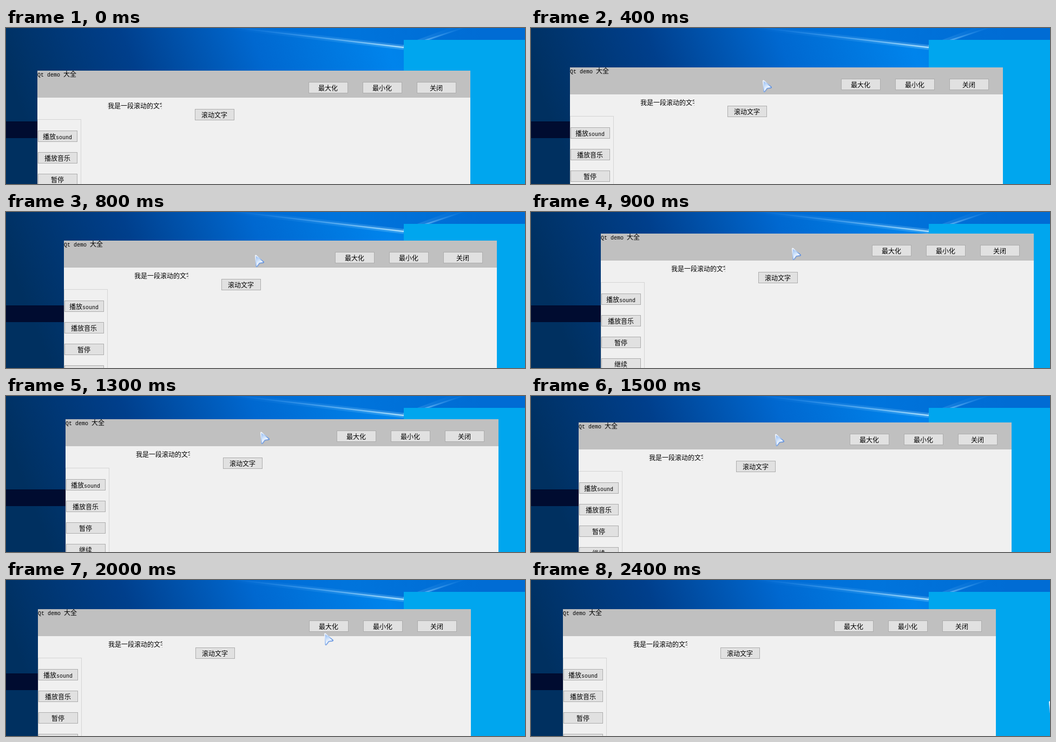
Animation of 959 by 289 pixels, one loop 2500 ms. Source, as an HTML page with a canvas:

```html
<!DOCTYPE html>
<html lang="zh-CN">
<head>
<meta charset="utf-8">
<title>Qt demo</title>
<style>
  html, body { margin: 0; width: 100%; height: 100%; overflow: hidden; background: #003264; }
  canvas { display: block; }
</style>
</head>
<body>
<canvas id="stage" width="959" height="289"></canvas>
<script>
const W = 959, H = 289, LOOP = 2500, STEP = 100;
const POINTER_SHOWN = 100, POINTER_LAG = 25, RELEASE = 1700, GLIDE = 700;
const ctx = document.getElementById('stage').getContext('2d');
const FONT_CJK = '12px "Noto Sans CJK SC", "Noto Sans CJK", sans-serif';
const FONT_LATIN = '10px "Liberation Mono", monospace';

const home = { x: 58, y: 79 };
const grip = { x: 358, y: 23 };
const drags = [
  { from: 200, to: 600, dx: 27, dy: -13 },
  { from: 700, to: 900, dx: 44, dy: -26 },
  { from: 1100, to: 1300, dx: -19, dy: 3 },
  { from: 1400, to: 1600, dx: -45, dy: 11 },
  { from: 1600, to: 1700, dx: -6, dy: 0 }
];

const progress = (t, from, to) => Math.min(1, Math.max(0, (t - from) / (to - from)));

function windowAt(t) {
  return drags.reduce(({ x, y }, { from, to, dx, dy }) => {
    const k = progress(t, from, to);
    return { x: x + dx * k, y: y + dy * k };
  }, home);
}

// The pointer trails the dragged window a little, then speeds off to the right
function pointerAt(t) {
  const held = windowAt(t - POINTER_LAG);
  const k = progress(t, RELEASE, RELEASE + GLIDE);
  return {
    x: held.x + grip.x + 540 * k ** 1.36,
    y: held.y + grip.y + 147 * k ** 2.3
  };
}

function drawAt({ x, y }, draw) {
  ctx.save();
  ctx.translate(Math.round(x), Math.round(y));
  draw();
  ctx.restore();
}

function gradient(x0, y0, x1, y1, ...colors) {
  const g = ctx.createLinearGradient(x0, y0, x1, y1);
  colors.forEach((color, i) => g.addColorStop(i / (colors.length - 1), color));
  return g;
}

function rect(x, y, w, h, fill) {
  ctx.fillStyle = fill;
  ctx.fillRect(x, y, w, h);
}

function polygon(points, fill) {
  ctx.beginPath();
  points.forEach(([x, y]) => ctx.lineTo(x, y));
  ctx.closePath();
  ctx.fillStyle = fill;
  ctx.fill();
}

// Light rays all meet at the corner of the bright square
function beam(x, y, width, alpha) {
  ctx.strokeStyle = gradient(x, y, 735, 36, 'rgba(60,160,250,0)', `rgba(190,235,255,${alpha})`);
  ctx.lineWidth = width;
  ctx.beginPath();
  ctx.moveTo(x, y);
  ctx.lineTo(735, 36);
  ctx.stroke();
}

function drawWallpaper() {
  rect(0, 0, W, H, gradient(0, 80, 830, -250, '#003060', '#003f8c', '#0068d0', '#0084ec', '#0078dc'));
  rect(0, 173, 200, 31, '#000c30');
  polygon([[400, 0], [W, 0], [W, 24], [735, 36]],
    gradient(400, 0, 880, 0, 'rgba(0,100,210,0)', '#0074dc', '#006cd4'));
  for (const x of [400, 840]) {
    beam(x, -3, 9, 0.25);
    beam(x + 10, -2, 2.5, 0.85);
  }
  rect(735, 22, 300, 300, '#00a6ee');
}

// Latin letters are 6px wide, Chinese ones 12px
function textRuns(text) {
  return text.match(/[\x20-\x7e]+|[^\x20-\x7e]+/g).map(run => {
    const latin = run.charCodeAt(0) < 127;
    return { run, font: latin ? FONT_LATIN : FONT_CJK, width: run.length * (latin ? 6 : 12) };
  });
}

function label(text, x, baseline) {
  ctx.fillStyle = '#000';
  for (const { run, font, width } of textRuns(text)) {
    ctx.font = font;
    ctx.fillText(run, x, baseline);
    x += width;
  }
}

function button(text, x, y) {
  rect(x, y, 73, 21, '#adadad');
  rect(x + 1, y + 1, 71, 19, '#e1e1e1');
  const width = textRuns(text).reduce((sum, part) => sum + part.width, 0);
  label(text, x + Math.floor((73 - width) / 2), y + 16);
}

function drawMarquee() {
  ctx.save();
  ctx.beginPath();
  ctx.rect(130, 50, 100, 30);
  ctx.clip();
  label('我是一段滚动的文字', 130, 70);
  ctx.restore();
}

function drawWindow() {
  rect(0, 0, 800, 300, '#f0f0f0');
  rect(0, 0, 800, 50, '#c0c0c0');
  label('Qt demo 大全', 0, 11);
  ['最大化', '最小化', '关闭'].forEach((text, i) => button(text, 501 + 100 * i, 21));
  drawMarquee();
  button('滚动文字', 291, 71);
  rect(0, 90, 81, 210, '#d4d4d4');
  rect(1, 91, 79, 209, '#f0f0f0');
  ['播放sound', '播放音乐', '暂停', '继续'].forEach((text, i) => button(text, 1, 111 + 40 * i));
}

function drawPointer() {
  const shape = [[1.5, 2], [15.5, 14], [8, 15], [3, 21.5]];
  ctx.lineJoin = 'round';
  ctx.shadowColor = 'rgba(40,70,120,0.35)';
  ctx.shadowBlur = 2;
  ctx.shadowOffsetX = ctx.shadowOffsetY = 1;
  polygon(shape, '#fff');
  ctx.shadowColor = 'transparent';
  ctx.strokeStyle = gradient(0, 6, 12, 16, '#f4f8ff', '#a4c4f2', '#5c8fe0');
  ctx.lineWidth = 3;
  ctx.stroke();
  polygon(shape, gradient(2, 4, 10, 16, '#9cc0f2', '#c8defa', '#f6faff'));
}

function frame(now) {
  const t = Math.floor((now % LOOP) / STEP) * STEP;
  drawWallpaper();
  drawAt(windowAt(t), drawWindow);
  if (t >= POINTER_SHOWN) drawAt(pointerAt(t), drawPointer);
}

const start = performance.now();
function tick() {
  frame(performance.now() - start);
  requestAnimationFrame(tick);
}
tick();
</script>
</body>
</html>
```
